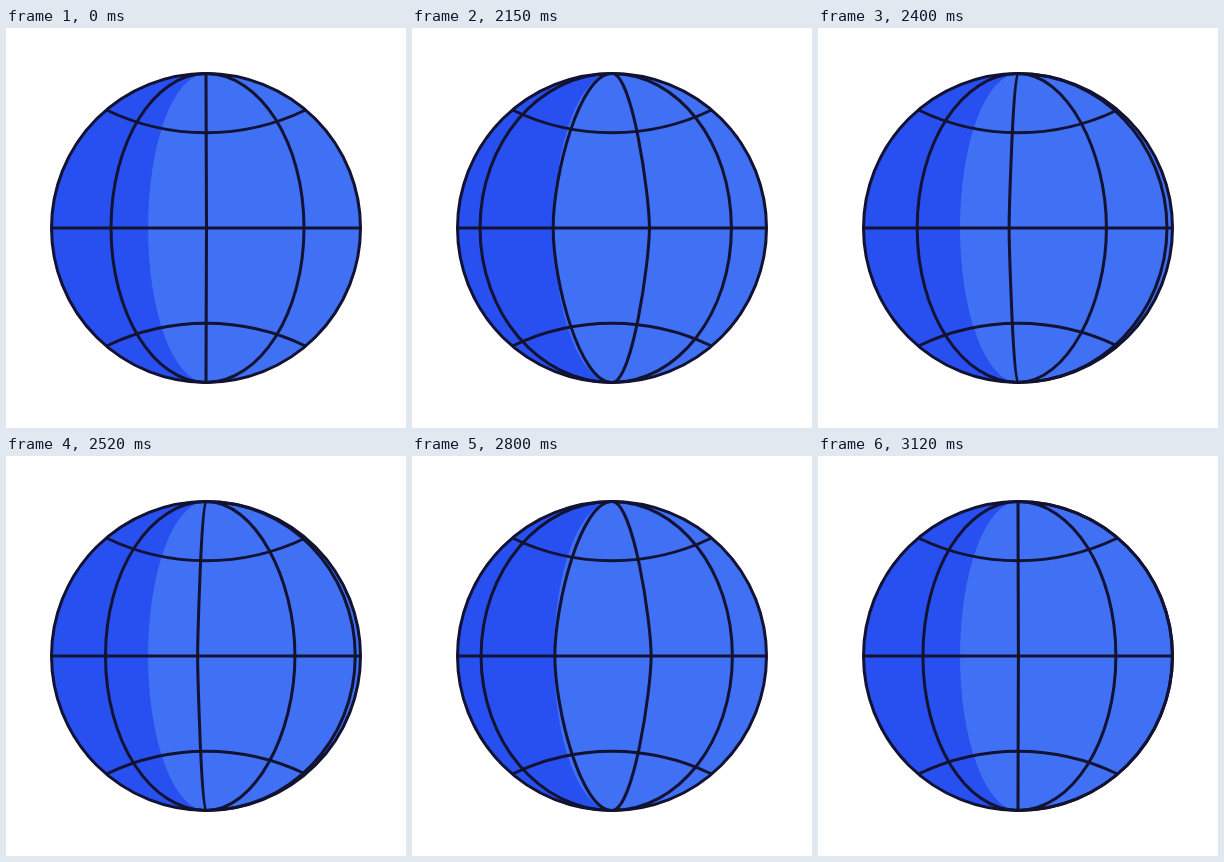
Write an HTML page that moves like this. It is 400 px wide and 400 px high and loops after 3200 ms.

```html
<!DOCTYPE html>
<html lang="en">
<head>
<meta charset="utf-8">
<title>Spinning globe</title>
<style>
  html, body { margin: 0; width: 100%; height: 100%; overflow: hidden; background: #fff; }
  svg { display: block; width: 100%; height: 100%; }
</style>
</head>
<body>
<svg viewBox="0 0 400 400">
  <circle cx="200" cy="200" r="154.5" fill="#2850f0"/>
  <path d="M200 45.5A154.5 154.5 0 0 1 200 354.5A58 154.5 0 0 1 200 45.5" fill="#4070f4"/>
  <g fill="none" stroke="#121233" stroke-width="3">
    <circle cx="200" cy="200" r="154.5"/>
    <path d="M45.5 200H354.5M100.5 82A229 229 0 0 0 299.5 82M100.5 318A229 229 0 0 1 299.5 318"/>
    <path id="meridians"/>
  </g>
</svg>
<script>
const LOOP = 3200, STEP = 25, START = 2000, DURATION = 1140, TURNS = 7;
const R = 154.5, KAPPA = 0.5523;

// Resting places of a meridian, left to right; the middle one is straight.
const slots = [[-R, 1], [-95, 1], [0.5, 0], [98, 1], [R, 1]].map(([x, bend]) => ({
  x, handleX: KAPPA * x * bend, handleY: KAPPA * R * bend
}));
const meridians = document.getElementById('meridians');

const lerp = (a, b, p) => a + (b - a) * p;
const bezier = (a, b, s) => 3 * (1 - s) ** 2 * s * a + 3 * (1 - s) * s * s * b + s ** 3;

function ease(u) {
  if (u <= 0 || u >= 1) return u <= 0 ? 0 : 1;
  let low = 0, high = 1;
  for (let i = 0; i < 30; i++) {
    const mid = (low + high) / 2;
    if (bezier(0.167, 0.445, mid) < u) low = mid; else high = mid;
  }
  return bezier(0.167, 1, low);
}

function meridian(from, to, p) {
  const x = 200 + lerp(from.x, to.x, p);
  const hx = 200 + lerp(from.handleX, to.handleX, p);
  const hy = 200 - lerp(from.handleY, to.handleY, p);
  return `M200 45.5C${hx} 45.5 ${x} ${hy} ${x} 200S${hx} 354.5 200 354.5`;
}

function draw(time) {
  const t = Math.floor((time % LOOP + 6) / STEP) * STEP;
  const p = TURNS * ease((t - START) / DURATION) % 1;
  let d = '';
  // The entering meridian stays hidden while it is close to the rim.
  for (let i = p < 0.2 ? 1 : 0; i < 4; i++) d += meridian(slots[i], slots[i + 1], p);
  meridians.setAttribute('d', d);
}

const begin = performance.now();
function frame() {
  draw(performance.now() - begin);
  requestAnimationFrame(frame);
}
frame();
</script>
</body>
</html>
```
